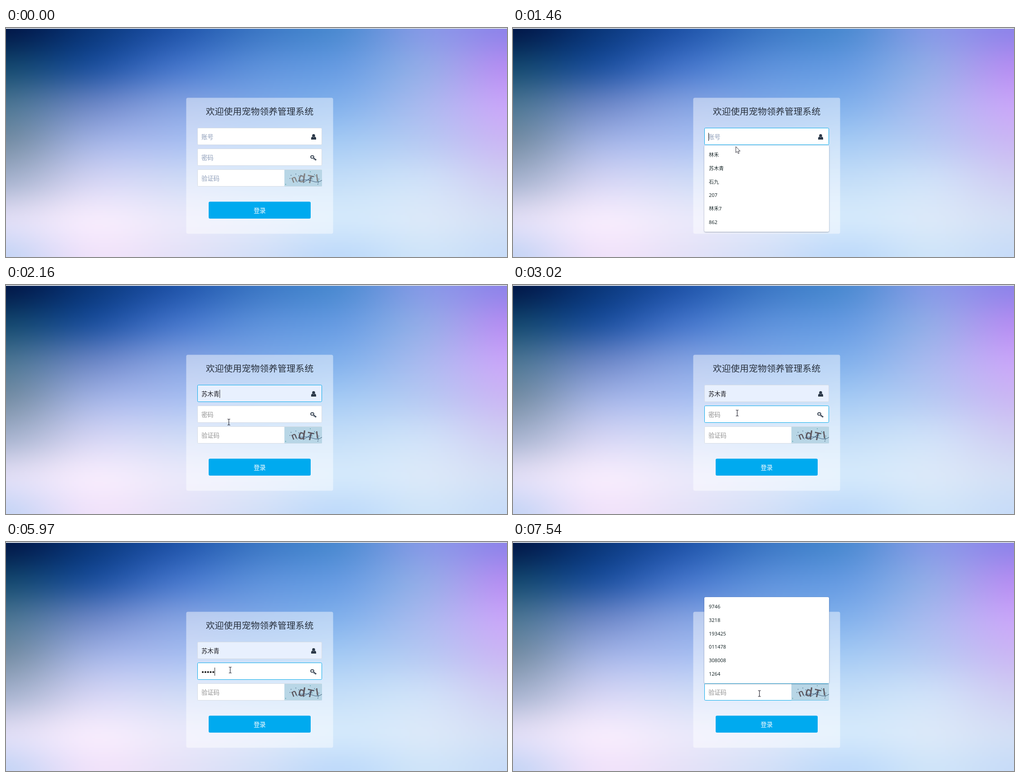
An HTML page with a canvas that plays this animation: 1105x507 px, repeating every 8 s.

```html
<!DOCTYPE html>
<html lang="zh-CN">
<head>
<meta charset="utf-8">
<title>登录</title>
<style>
  html, body { margin: 0; width: 100%; height: 100%; overflow: hidden; }
  canvas, svg { position: absolute; left: 0; top: 0; width: 1105px; height: 507px; }
  text { font-family: "Noto Sans", "Noto Sans CJK SC", sans-serif; font-size: 13.3px; }
  .menu { filter: drop-shadow(0 1px 1.5px rgba(40, 60, 90, .45)); }
  .menu text { font-size: 11px; fill: #1c2a2c; }
  .captcha text { font-family: "Liberation Sans", sans-serif; font-size: 25px; }
</style>
</head>
<body>
<canvas id="sky" width="277" height="127"></canvas>
<svg id="stage" viewBox="0 0 1105 507">
  <defs>
    <clipPath id="codeBox"><rect x="614" y="314" width="83" height="36.5"/></clipPath>
  </defs>
  <rect width="1105" height="1" fill="#fff"/>
  <rect y="1" width="1105" height="1" fill="#b3bccb"/>
  <rect x="397.5" y="154.5" width="324" height="301" rx="4" fill="#fff" fill-opacity=".45"/>
  <text x="559.5" y="192.3" text-anchor="middle" fill="#29323f" style="font-size:19.8px">欢迎使用宠物领养管理系统</text>
  <g id="form"></g>
  <g fill="#2b3848">
    <circle cx="678.5" cy="238.2" r="3.2"/>
    <path d="M673 247V244.5Q673 241 676 240.8Q678.500 243 681 240.8Q684 241 684 244.500V247Z"/>
  </g>
  <g fill="none" stroke="#2b3848" stroke-width="1.7">
    <ellipse cx="675.5" cy="285.6" rx="3.4" ry="2.9"/>
    <path d="M678 287.400L684.5 292.300M680.200 289.200L678.800 291.200M682.800 291L681.500 293"/>
  </g>
  <g class="captcha" clip-path="url(#codeBox)">
    <rect x="614" y="314" width="83" height="37" fill="#b8d6e6"/>
    <g id="letters" stroke-width=".6"></g>
    <path d="M644 338Q664 334 676 339T697 337M655 343L678 328" fill="none" stroke="#3d5878" stroke-width="1"/>
    <g id="specks"></g>
  </g>
  <rect x="447" y="384.5" width="225" height="37.5" rx="3" fill="#00aaef"/>
  <text x="559.5" y="408.5" text-anchor="middle" fill="#fff">登录</text>
  <g id="menus"></g>
  <rect id="caret" width="1" height="18" fill="#1d1d1d"/>
  <g id="cursor">
    <path id="arrow" d="M0 0V13.500L3 10.800L5.200 15.500L7.300 14.600L5.200 10H9.500Z" fill="#fff" stroke="#1c1c28" stroke-width=".9"/>
    <path id="beam" d="M-3-6.500H-1L0-5.500L1-6.500H3M0-5.500V5.500M-3 6.500H-1L0 5.500L1 6.500H3" fill="none" stroke="#1c1c28" stroke-width="1.1"/>
  </g>
</svg>
<script>
const LOOP = 8000;
const $ = id => document.getElementById(id);
const clamp = (v, lo, hi) => Math.max(lo, Math.min(hi, v));
const ramp = (t, a, b) => clamp((t - a) / (b - a), 0, 1);
const show = (el, on) => el.setAttribute("visibility", on ? "visible" : "hidden");

function add(parent, tag, attrs, text) {
  const el = document.createElementNS("http://www.w3.org/2000/svg", tag);
  for (const key in attrs) el.setAttribute(key, attrs[key]);
  if (text) el.textContent = text;
  parent.append(el);
  return el;
}

// Backdrop: a smooth colour mesh, evenly spaced over the stage
const mesh = [
  ["#02194a", "#0a3679", "#1f53a8", "#3b76c4", "#4e8bd2", "#8599e6", "#8f84ea"],
  ["#16486f", "#1f519c", "#4474c8", "#5c90da", "#689ce2", "#94abe8", "#b48ff2"],
  ["#4c7593", "#6a86c4", "#82a0e0", "#7fa9e8", "#84b2ec", "#a9b9ef", "#c8a6f8"],
  ["#7890a8", "#a2b2e2", "#a9bef0", "#a0c4f2", "#a6cbf4", "#b8caf3", "#cbb8f4"],
  ["#a8b4cf", "#d2d3f2", "#d0daf6", "#c4dcf8", "#c4def8", "#cfe0f8", "#d0cef3"],
  ["#dedcf4", "#f4eafc", "#eae8fa", "#dfe8fa", "#d3e8fb", "#dae8f9", "#d3def5"],
  ["#c8d6f6", "#efe2fa", "#e6e2f8", "#d4e0f8", "#c0dbfa", "#cfe4f9", "#c8dcf8"]
].map(row => row.map(hex => [1, 3, 5].map(i => parseInt(hex.slice(i, i + 2), 16))));

function spline(points, u) {
  const last = points.length - 1;
  const i = Math.min(Math.floor(u), last - 1), f = u - i;
  const [a, b, c, d] = [-1, 0, 1, 2].map(k => points[clamp(i + k, 0, last)]);
  return b.map((v, n) => v + f / 2 * (c[n] - a[n]
    + f * (2 * a[n] - 5 * v + 4 * c[n] - d[n] + f * (3 * (v - c[n]) + d[n] - a[n]))));
}

function paintSky() {
  const { width, height } = $("sky");
  const ctx = $("sky").getContext("2d");
  const image = ctx.createImageData(width, height);
  for (let x = 0; x < width; x++) {
    const column = mesh.map(row => spline(row, x / (width - 1) * 6));
    for (let y = 0; y < height; y++) {
      image.data.set([...spline(column, y / (height - 1) * 6), 255], (y * width + x) * 4);
    }
  }
  ctx.putImageData(image, 0, 0);
}

// Form fields
function addField(y, hint) {
  return {
    y,
    box: add($("form"), "rect", { x: 422.5, y: y + .5, width: 274, height: 37, rx: 2, fill: "#fff" }),
    hint: add($("form"), "text", { x: 431, y: y + 25.2 }, hint)
  };
}
const account = addField(221, "账号");
const password = addField(267, "密码");
const code = addField(313, "验证码");
const fields = [account, password, code];
const accountText = add($("form"), "text", { x: 431, y: 246.2, fill: "#1b1b22" });

const DOT = 5.8;
const presses = [4960, 5190, 5360, 5660, 5970, 6140];
const dots = presses.map((_, i) =>
  add($("form"), "circle", { cx: 434 + i * DOT, cy: 288, r: 2.1, fill: "#1d1d1d" }));

// Distorted letters and specks of the check image
[["n", 629, 341, -22, 20], ["d", 645, 341, 8, 27], ["T", 664, 343, 12, 24], ["I", 683, 339, -8, 22]]
  .forEach(([ch, x, y, turn, size]) => add($("letters"), "text",
    { x, y, transform: `rotate(${turn} ${x + 6} ${y - 8})`, style: `font-size:${size}px` }, ch));
let seed = 7;
const random = () => (seed = seed * 16807 % 2147483647) / 2147483647;
for (let i = 0; i < 20; i++) {
  add($("specks"), "rect", {
    x: 616 + random() * 78, y: 316 + random() * 32, width: 1.5, height: 1.3,
    fill: i % 4 ? "#34506e" : "#2f8a86"
  });
}

// Suggestion lists
const ROW = 29.65;
function addMenu(y, items) {
  const el = add($("menus"), "g", { class: "menu" });
  add(el, "rect", { x: 422, y, width: 275, height: 191, rx: 3, fill: "#fff" });
  const bar = add(el, "rect", { x: 422, width: 275, height: ROW, fill: "#e8e8eb" });
  items.forEach((item, i) => add(el, "text", { x: 432, y: y + 25.3 + i * ROW }, item));
  return { el, bar, items, top: y + 6.5 };
}
const nameMenu = addMenu(260, ["林禾", "苏木青", "石九", "207", "林禾7", "862"]);
const codeMenu = addMenu(122, ["9746", "3218", "193425", "011478", "308008", "1264"]);
show(codeMenu.bar, false);

// Pointer motion is held between evenly spaced steps: start, end, count
const spans = [[70, 850, 11], [1140, 1860, 10], [2010, 2010, 1], [2160, 2320, 3],
  [2470, 2640, 3], [6140, 6530, 6], [6760, 7230, 7]];
function snap(t) {
  const span = spans.filter(s => t >= s[0]).pop();
  if (!span) return 0;
  const [start, end, count] = span;
  if (t >= end) return end;
  const step = (end - start) / (count - 1);
  return start + Math.floor((t - start) / step + 1e-6) * step;
}

// time, x, y
const path = [
  [70, 848, 455], [304, 650, 330], [538, 520, 262], [694, 487, 241], [850, 494, 244],
  [1300, 494, 244], [1700, 487, 289], [1780, 480, 296], [1860, 477, 299], [2010, 485, 300],
  [2160, 491, 303], [2320, 494, 283], [6140, 494, 283], [6218, 499, 289],
  [6530, 553, 328], [6760, 553, 328], [6990, 543, 335]
];
function pointerAt(t) {
  const i = path.findIndex(p => p[0] > t);
  if (i < 1) return path[i < 0 ? path.length - 1 : 0].slice(1);
  const [a, b] = [path[i - 1], path[i]], f = ramp(t, a[0], b[0]);
  return [1, 2].map(n => a[n] + (b[n] - a[n]) * f);
}

// time, x, y; without a place the caret is hidden
const carets = [
  [0], [1140, 431, 232], [2160, 471, 232], [2470, 431, 278], [3020], [3480, 431, 278],
  [4030], [4580, 431, 278],
  ...presses.map((p, i) => [p, Math.round(431 + (i + 1) * DOT), 278]),
  [6760], [6990, 431, 324], [7540]
];

const mix = (a, b, f) => `rgb(${a.map((v, i) => Math.round(v + (b[i] - v) * f))})`;
const GREY = [214, 220, 228], BLUE = [10, 171, 234];

function draw(t) {
  const s = snap(t);
  const [x, y] = pointerAt(s);
  const namesOpen = t >= 1220 && t < 2160;
  const codesOpen = t >= 7070;
  const chosen = t >= 2160;

  const toPassword = ramp(s, 2470, 2640), toCode = ramp(s, 6990, 7230);
  const focus = [ramp(s, 1140, 1380) - toPassword, toPassword - toCode, toCode];
  fields.forEach((field, i) => {
    field.box.setAttribute("stroke", mix(GREY, BLUE, focus[i]));
    field.hint.setAttribute("fill", chosen ? "#929292" : "#8d9db9");
  });

  const row = namesOpen ? Math.floor((y - nameMenu.top) / ROW) : -1;
  const name = chosen ? nameMenu.items[1] : nameMenu.items[row] || "";
  accountText.textContent = name;
  account.box.setAttribute("fill", name ? "#e8f0fe" : "#fff");
  show(account.hint, !name);
  show(nameMenu.el, namesOpen);
  show(nameMenu.bar, row >= 0);
  nameMenu.bar.setAttribute("y", nameMenu.top + Math.max(row, 0) * ROW);
  show(codeMenu.el, codesOpen);

  show(password.hint, t < presses[0]);
  dots.forEach((dot, i) => show(dot, t >= presses[i]));

  const [, cx, cy] = carets.filter(c => t >= c[0]).pop();
  show($("caret"), cx);
  if (cx) {
    $("caret").setAttribute("x", cx);
    $("caret").setAttribute("y", cy);
  }

  $("letters").setAttribute("fill", chosen ? "#625a62" : "#7b7e86");
  $("letters").setAttribute("stroke", chosen ? "#4f484f" : "#8a8078");

  const overField = fields.some(f => y >= f.y && y <= f.y + 38 && x > 422 && x < (f === code ? 614 : 697));
  const beam = overField && !(namesOpen && y > 260);
  const moving = t >= 70;
  show($("beam"), moving && beam);
  show($("arrow"), moving && !beam);
  $("cursor").setAttribute("transform", `translate(${Math.round(x) + .5} ${Math.round(y) + .5})`);
}

paintSky();
const begin = performance.now();
function tick() {
  draw((performance.now() - begin) % LOOP);
  requestAnimationFrame(tick);
}
tick();
</script>
</body>
</html>
```
